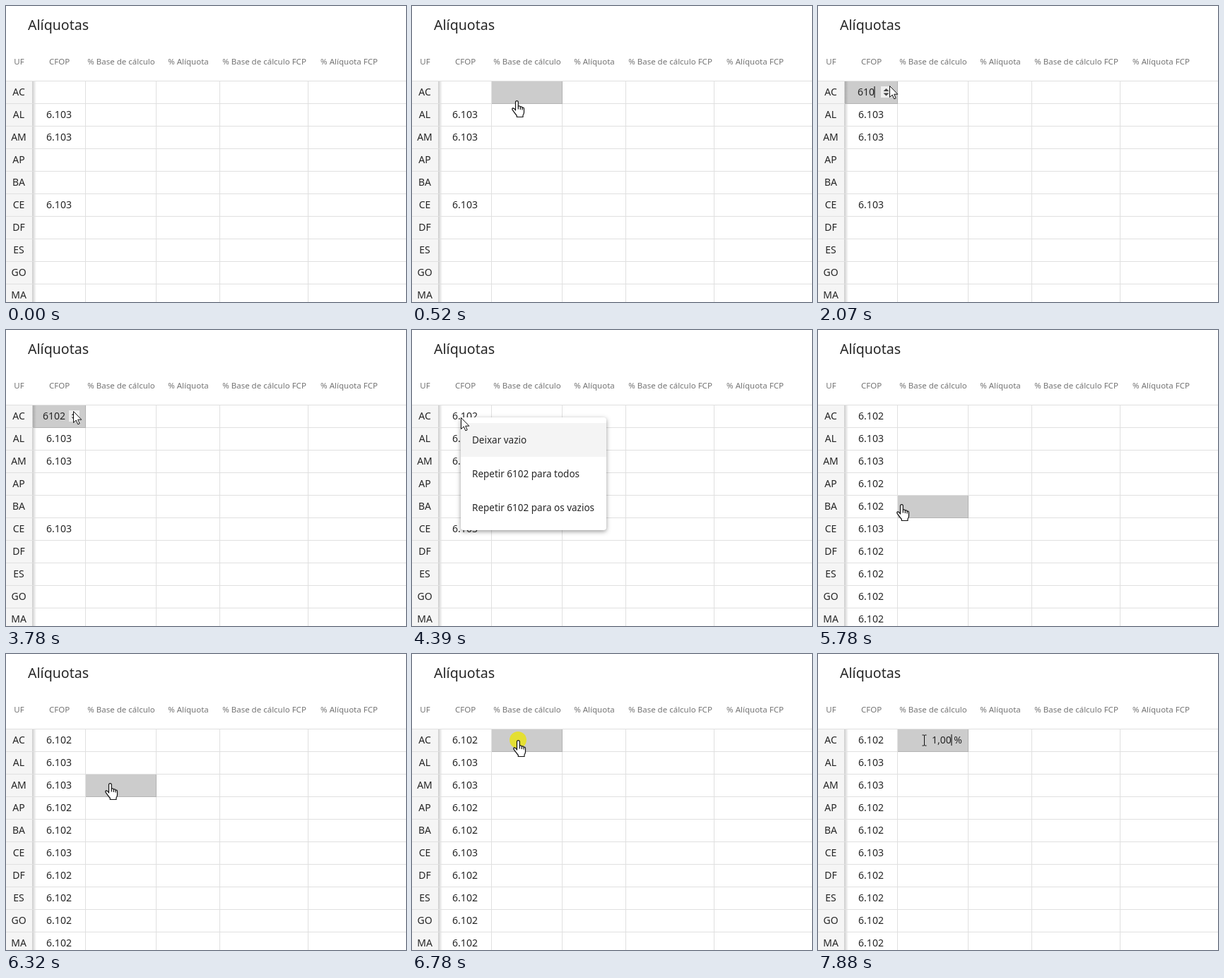
Animation of 566x420 px, one loop 8 s. Source, as an HTML page with a canvas:

```html
<!DOCTYPE html>
<html lang="pt-BR">
<head>
<meta charset="utf-8">
<title>Alíquotas</title>
<style>
  html, body { margin: 0; width: 100%; height: 100%; overflow: hidden; background: #fff; }
  canvas { display: block; }
</style>
</head>
<body>
<canvas width="566" height="420"></canvas>
<script>
const ctx = document.querySelector('canvas').getContext('2d');
const LOOP = 8000, STEP = 77.3, FIRST_MOVE = 290;
const ROW = 32, TOP = 107;
const INK = '#262626', MUTED = '#757575', LINE = '#e0e0e0';
const STATES = ['AC', 'AL', 'AM', 'AP', 'BA', 'CE', 'DF', 'ES', 'GO', 'MA'];
const FILLED = ['AL', 'AM', 'CE'];
const COLUMNS = [38, 113, 213, 303, 428, 600];
const HEADERS = [['UF', 18.5], ['CFOP', 75.5], ['% Base de cálculo', 163], ['% Alíquota', 258],
  ['% Base de cálculo FCP', 365.5], ['% Alíquota FCP', 485.5]];
const OPTIONS = ['Deixar vazio', 'Repetir 6102 para todos', 'Repetir 6102 para os vazios'];
const MENU = { x: 69, y: 124, w: 206, h: 160, item: 48, open: 4080, pick: 5470, fill: 5620, close: 5780 };

// Pointer path: time, x, y
const PATH = [
  [290, 330, 337], [367, 244, 236], [444, 184, 164], [522, 148, 134], [599, 126, 122], [831, 101, 113],
  [3700, 101, 113], [3860, 86, 118], [4010, 69, 124],
  [4480, 69, 124], [4700, 80, 145], [5000, 110, 215], [5320, 118, 247],
  [6103, 118, 247], [6319, 147, 183], [6550, 150, 126], [6782, 150, 122]
];
const CLICKS = [[980, 1060], [5470, 5620], [6780, 6930]];
const CFOP_KEYS = [[1060, ''], [1840, '6'], [1920, '61'], [2070, '610'], [2770, '6102']];
const BASE_KEYS = [[7010, ''], [7560, '0,01 %'], [7630, '0,10 %'], [7880, '1,00 %']];

const ARROW = new Path2D('M.5 .5V16.5L4.2 13 6.8 18.8 9.2 17.8 6.7 12.2H11.8Z');
const HAND = new Path2D('M5.5 14V2.5a1.9 1.9 0 0 1 3.8 0V8.2q2.6-.8 3 .9q2.4-.6 2.8 1q2.2-.3 2.4 1.6V17' +
  'q0 2-1.5 4V23.5H7.3V21.5Q5 19 1 13.2Q.3 11 2 10.8Q4 11 5.5 14Z');
const KNUCKLES = new Path2D('M9.3 8.2V12.5M12.3 9.1V13M15.1 10.1V13.5');
const BEAM = new Path2D('M-3-7.5H-1Q0-7.5 0-6.5Q0-7.5 1-7.5H3M0-6.5V6.5M-3 7.5H-1Q0 7.5 0 6.5Q0 7.5 1 7.5H3');

const clamp = v => Math.max(0, Math.min(1, v));
const lastBefore = (list, t) => list.filter(item => item[0] <= t).pop();

function rect(x, y, w, h, color) {
  ctx.fillStyle = color;
  ctx.fillRect(x, y, w, h);
}

function text(str, x, y, size = 14, align = 'center', color = INK) {
  ctx.font = `${size}px "Noto Sans", sans-serif`;
  ctx.textAlign = align;
  ctx.fillStyle = color;
  ctx.fillText(str, x, y);
}

function disc(x, y, r, color) {
  ctx.fillStyle = color;
  ctx.beginPath();
  ctx.arc(x, y, r, 0, 2 * Math.PI);
  ctx.fill();
}

function pointerAt(t) {
  const i = PATH.findIndex(p => p[0] > t);
  if (i < 0) return PATH[PATH.length - 1].slice(1);
  if (i === 0) return PATH[0].slice(1);
  const [t0, x0, y0] = PATH[i - 1], [t1, x1, y1] = PATH[i];
  const p = (t - t0) / (t1 - t0);
  return [x0 + (x1 - x0) * p, y0 + (y1 - y0) * p].map(Math.round);
}

function drawGrid() {
  text('Alíquotas', 31, 34, 19.6, 'left');
  for (const [label, x] of HEADERS) text(label, x, 83, 11.5, 'center', MUTED);
  rect(0, TOP, 37, 420, '#f5f5f5');
  const shade = ctx.createLinearGradient(37, 0, 43, 0);
  shade.addColorStop(0, 'rgba(0,0,0,.2)');
  shade.addColorStop(1, 'rgba(0,0,0,0)');
  rect(37, TOP, 6, 420, shade);
  for (const x of COLUMNS.slice(1)) rect(x - 1, TOP, 1, 420, LINE);
  for (let y = TOP - 1; y < 420; y += ROW) rect(0, y, 566, 1, LINE);
}

function drawHover(x, y) {
  const col = COLUMNS.findIndex((left, i) => x >= left && x < COLUMNS[i + 1]);
  const row = Math.floor((y - TOP) / ROW);
  rect(COLUMNS[col], TOP + row * ROW, COLUMNS[col + 1] - COLUMNS[col], ROW, 'rgba(0,0,0,.2)');
}

function drawValues(t) {
  STATES.forEach((state, i) => {
    const y = 127 + i * ROW;
    text(state, 18, y);
    if (FILLED.includes(state)) text('6.103', 75, y);
    else if (t >= MENU.fill || (i === 0 && t >= MENU.open)) text('6.102', 75, y);
  });
}

function drawCaret(x, t, since) {
  if ((t - since) % 1100 < 550) rect(Math.round(x) - 0.5, 114, 1, 16, '#000');
}

function drawEditing(t) {
  if (t >= 1060 && t < MENU.open) {
    const [since, value] = lastBefore(CFOP_KEYS, t);
    text(value, 68, 127);
    drawCaret(68 + ctx.measureText(value).width / 2, t, since);
    rect(89, 114, 15, 16, '#efefef');
    ctx.fillStyle = '#444';
    ctx.fill(new Path2D('M92.5 121L96.5 117 100.5 121ZM92.5 123.5H100.5L96.5 127.5Z'));
  } else if (t >= 7010) {
    const [since, value] = lastBefore(BASE_KEYS, t);
    text(value, 204, 127);
    rect(0, 0, 0, 0, INK);
  }
}

function drawBaseInput(t) {
  if (t < 7010) return;
  const [since, value] = lastBefore(BASE_KEYS, t);
  text(value, 204, 127, 14, 'right');
  drawCaret(value ? 189 : 203.5, t, since);
}

function drawMenu(t, q, x, y) {
  const { item } = MENU;
  const shown = clamp((q - 4000) / 240);
  const scale = 0.8 + 0.2 * shown;
  ctx.save();
  ctx.globalAlpha = shown * clamp((MENU.close - q) / 160);
  ctx.translate(MENU.x, MENU.y);
  ctx.scale(scale, scale);
  ctx.save();
  ctx.shadowColor = 'rgba(0,0,0,.4)';
  ctx.shadowBlur = 6;
  ctx.shadowOffsetY = 2;
  ctx.fillStyle = '#fff';
  ctx.beginPath();
  ctx.roundRect(0, 0, MENU.w, MENU.h, 4);
  ctx.fill();
  ctx.restore();

  const active = Math.max(0, Math.floor((y - MENU.y - 8) / item));
  rect(0, 8 + active * item, MENU.w, item, '#f4f4f4');
  OPTIONS.forEach((label, i) => text(label, 16, 37 + i * item, 13.5, 'left'));
  if (t >= MENU.pick) {
    ctx.beginPath();
    ctx.rect(0, 8 + active * item, MENU.w, item);
    ctx.clip();
    disc(x - MENU.x, y + 2 - MENU.y, 22 + Math.max(0, q - MENU.pick) * 0.4, 'rgba(0,0,0,.11)');
  }
  ctx.restore();
}

function pointerKind(t, y) {
  if (t < 1060) return 'hand';
  if (t < 3860) return 'arrow';
  if (t < 4160) return 'beam';
  if (t < MENU.pick && y < MENU.y + 8) return 'arrow';
  return t < 6930 ? 'hand' : 'beam';
}

function drawPointer(t, x, y) {
  if (CLICKS.some(([from, to]) => t >= from && t < to)) disc(x, y, 12, 'rgba(236,230,0,.75)');
  const kind = pointerKind(t, y);
  ctx.save();
  ctx.translate(x, y);
  ctx.strokeStyle = '#111';
  ctx.fillStyle = '#fff';
  ctx.lineJoin = 'round';
  if (kind === 'beam') {
    ctx.translate(0.5, 0.5);
    ctx.stroke(BEAM);
  } else if (kind === 'arrow') {
    ctx.fill(ARROW);
    ctx.stroke(ARROW);
  } else {
    ctx.translate(-7, 0);
    ctx.lineWidth = 1.2;
    ctx.fill(HAND);
    ctx.stroke(HAND);
    ctx.stroke(KNUCKLES);
  }
  ctx.restore();
}

function draw(t) {
  const q = FIRST_MOVE + Math.floor((t - FIRST_MOVE + 8) / STEP) * STEP;
  const [x, y] = pointerAt(q);
  const menuOpen = t >= MENU.open && t < MENU.close;
  rect(0, 0, 566, 420, '#fff');
  drawGrid();
  if (t >= FIRST_MOVE && !menuOpen) drawHover(x, y);
  drawValues(t);
  if (t < MENU.open) drawEditing(t);
  drawBaseInput(t);
  if (menuOpen) drawMenu(t, q, x, y);
  if (t >= FIRST_MOVE) drawPointer(t, x, y);
}

function frame() {
  draw(performance.now() % LOOP);
  requestAnimationFrame(frame);
}
frame();
</script>
</body>
</html>
```
